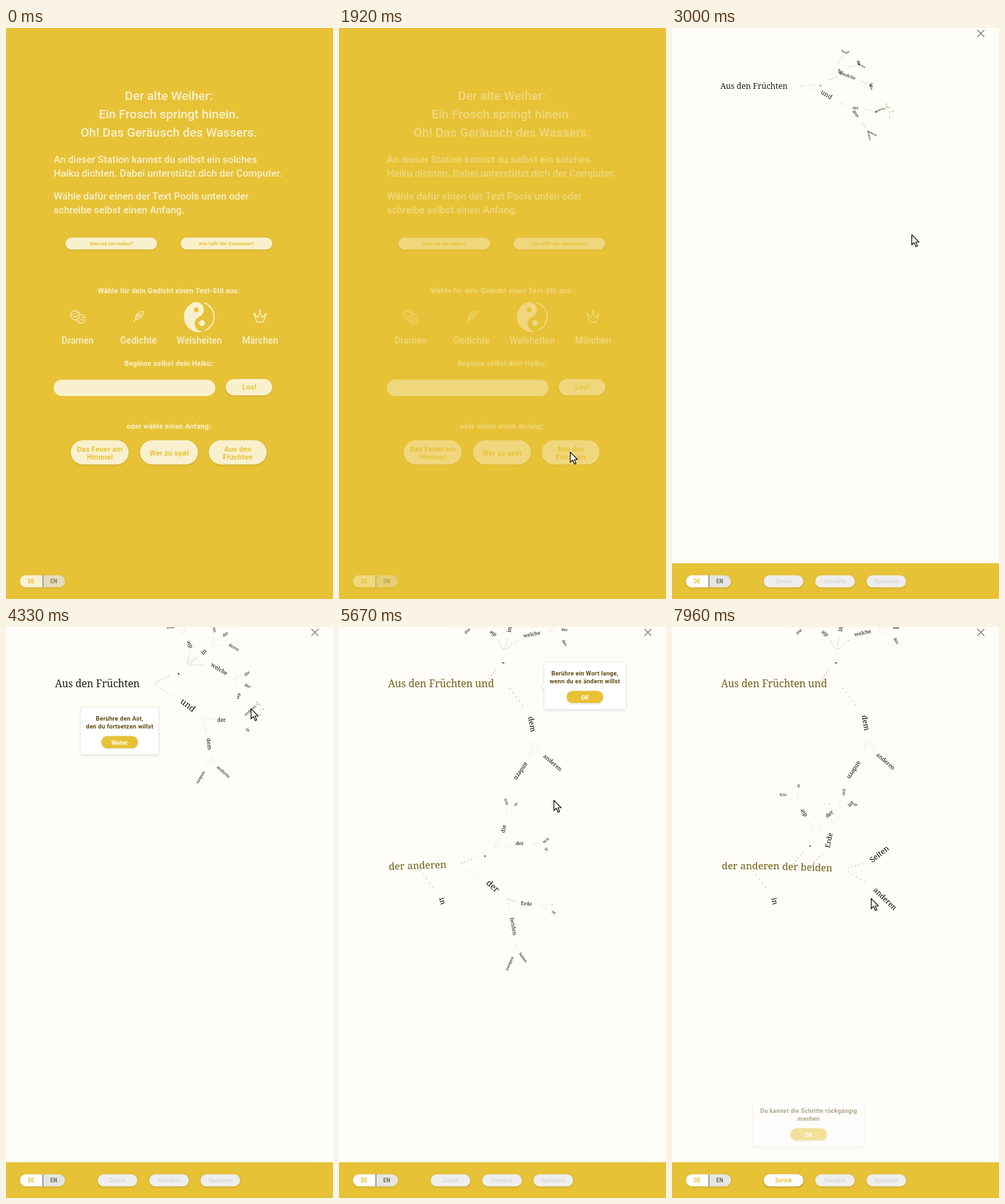
Recreate the animation shown at these times as an HTML page. Size 500x872 px, loop 8 s.

```html
<!DOCTYPE html>
<html lang="de">
<head>
<meta charset="utf-8">
<title>Haiku</title>
<style>
  html, body { margin: 0; width: 100%; height: 100%; overflow: hidden; background: #e7c236; }
  svg { display: block; width: 100%; height: 100%; }
  text { font-family: Roboto, "Open Sans", sans-serif; font-weight: 500; }
  .bold { font-weight: 700; }
  .serif { font-family: "Noto Serif", serif; font-weight: 400; }
  .raised { filter: drop-shadow(0 1px 1.5px rgba(60, 45, 0, .2)); }
  .card { filter: drop-shadow(0 1px 2px rgba(0, 0, 0, .16)); }
</style>
</head>
<body>
<svg id="stage" viewBox="0 0 500 872"></svg>
<script>
const LOOP = 8000;
const YELLOW = '#e7c236', PAPER = '#fefdf8';
const stage = document.getElementById('stage');

function el(parent, tag, attrs = {}, content) {
  const node = document.createElementNS('http://www.w3.org/2000/svg', tag);
  for (const name in attrs) node.setAttribute(name, attrs[name]);
  if (content) node.textContent = content;
  parent.append(node);
  return node;
}

// y is the middle of the capitals
function label(parent, content, x, y, size, fill, more = {}) {
  return el(parent, 'text', {
    x, y: y + size * .355, 'font-size': size, fill, 'text-anchor': 'middle', ...more
  }, content);
}

const bold = { class: 'bold' };
const spaced = { class: 'bold', 'letter-spacing': .25 };

function pill(parent, x, y, w, h, fill, shadow = true) {
  return el(parent, 'rect', { x, y, width: w, height: h, rx: h / 2, fill, class: shadow ? 'raised' : '' });
}

function languageSwitch(parent) {
  const g = el(parent, 'g', { class: 'raised' });
  el(g, 'path', { d: 'M30.500 835.800H56V854.200H30.500a9.200 9.200 0 0 1 0-18.400z', fill: '#fff' });
  el(g, 'path', { d: 'M56 835.800H81a9.200 9.200 0 0 1 0 18.400H56z', fill: '#e4e4e1' });
  el(g, 'path', { d: 'M56.400 835.800V854.200', stroke: '#555', 'stroke-width': 1 });
  label(g, 'DE', 38.5, 845.5, 8.2, YELLOW, bold);
  label(g, 'EN', 73, 845.5, 8.2, '#6d6a60', bold);
}

/* ---------- start page ---------- */
const intro = el(stage, 'g');
['Der alte Weiher:', 'Ein Frosch springt hinein.', 'Oh! Das Geräusch des Wassers.']
  .forEach((line, i) => label(intro, line, 249, 103 + i * 28, 19, PAPER));
[['An dieser Station kannst du selbst ein solches', 201],
 ['Haiku dichten. Dabei unterstützt dich der Computer.', 221.5],
 ['Wähle dafür einen der Text Pools unten oder', 257],
 ['schreibe selbst einen Anfang.', 277.5]
].forEach(([line, y]) => label(intro, line, 73, y, 15.1, PAPER, { 'text-anchor': 'start' }));

pill(intro, 91, 320, 140, 18.3, PAPER);
label(intro, 'Was ist ein Haiku?', 161, 329, 8, YELLOW, bold);
pill(intro, 267, 320, 140, 18.3, PAPER);
label(intro, 'Wie hilft der Computer?', 337, 329, 8, YELLOW, bold);

label(intro, 'Wähle für dein Gedicht einen Text-Stil aus:', 249, 401, 10.8, PAPER, spaced);
label(intro, 'Beginne selbst dein Haiku:', 249, 512, 10.8, PAPER, spaced);
label(intro, 'oder wähle einen Anfang:', 249, 608, 10.8, PAPER, spaced);
[['Dramen', 109.5], ['Gedichte', 202.5], ['Weisheiten', 295.5], ['Märchen', 388.5]]
  .forEach(([name, x]) => label(intro, name, x, 477, 14, PAPER));

const icons = el(intro, 'g', {
  fill: 'none', stroke: PAPER, 'stroke-width': 1.1, 'stroke-linecap': 'round', 'stroke-linejoin': 'round'
});
el(icons, 'circle', { cx: 114, cy: 444, r: 6.8 });
el(icons, 'circle', { cx: 105.7, cy: 438.7, r: 7, fill: YELLOW });
el(icons, 'path', { d: 'M101 438l3-1.5M107 436l3-1.5M102 441q4 2 8-2M111 448q3-4 7-2M115 442l3 .5' });
el(icons, 'path', { d: 'M195 449Q199 442 206 436M198 445C197 438 202 433 210.500 432.500C209 439 206 446 198 445M202 440h4M201 436v4' });
el(icons, 'path', { d: 'M380 438l3.500 11h10l3.500-11l-5.500 4l-3-8l-3 8z', 'stroke-width': 1.3 });
[[380, 437], [388.5, 432], [397, 437]].forEach(([cx, cy]) => el(icons, 'circle', { cx, cy, r: 1.1, fill: PAPER }));
const yin = el(icons, 'g', { transform: 'translate(295.5 441) rotate(-24)', stroke: 'none' });
el(yin, 'path', { d: 'M0 23.500A23.500 23.500 0 0 1 0-23.500A11.750 11.750 0 0 1 0 0A11.750 11.750 0 0 0 0 23.500', fill: PAPER });
el(yin, 'path', { d: 'M16-16A22.600 22.600 0 0 1 0 22.600', stroke: PAPER, 'stroke-width': 1.9 });
el(yin, 'circle', { cy: -11.5, r: 3.6, fill: YELLOW });
el(yin, 'circle', { cy: 10.5, r: 4.6, fill: PAPER });

pill(intro, 73, 537, 247, 25, PAPER, false);
pill(intro, 336, 536, 71, 25, PAPER);
label(intro, 'Los!', 372, 548.5, 11, YELLOW, spaced);
[['Das Feuer am', 'Himmel', 99], ['Wer zu spät', '', 205], ['Aus den', 'Früchten', 310]].forEach(([a, b, x]) => {
  pill(intro, x, 629.5, 88.5, 37, PAPER);
  label(intro, a, x + 44.5, b ? 643.5 : 649, 10.9, YELLOW, spaced);
  if (b) label(intro, b, x + 44.5, 655, 10.9, YELLOW, spaced);
});
languageSwitch(intro);

/* ---------- editor page ---------- */
const editor = el(stage, 'g');
el(editor, 'rect', { width: 500, height: 818, fill: PAPER });
el(editor, 'path', { d: 'M467 3l10.500 10.500M477.500 3L467 13.500', stroke: '#8d8d8a', 'stroke-width': 1.7 });
const tree = el(editor, 'g');
const spinner = el(editor, 'path', {
  d: 'M8.300 0A8.300 8.300 0 1 1 -8.200-1.400', fill: 'none', stroke: '#8d8d8a', 'stroke-width': 1.3
});
el(editor, 'rect', { y: 817.4, width: 500, height: 55, fill: YELLOW });
languageSwitch(editor);

function footerButton(name, x, fill, ink) {
  const g = el(editor, 'g');
  pill(g, x, 835.8, 60.5, 18.4, fill);
  label(g, name, x + 30.3, 845.5, 8.2, ink, bold);
  return g;
}
[['Zurück', 140.2], ['Vorwärts', 219], ['Speichern', 297.4]]
  .forEach(([name, x]) => footerButton(name, x, '#eeeeec', '#d9d9d6'));
const backButton = footerButton('Zurück', 140.2, '#fff', YELLOW);

/* ---------- word tree ---------- */
const ruler = document.createElement('canvas').getContext('2d');
ruler.font = '100px "Noto Serif", serif';
const DOTS = [.14, .27, .4, .53, .66];
const words = [];

// poses: [x, y, angle, size] of the word's inner end, one per layout A to E
function word(text, parent, poses, join = Infinity) {
  const w = {
    text, parent, poses, join,
    width: ruler.measureText(text).width / 100,
    birth: poses.A ? 2500 : 4950,
    dots: parent ? DOTS.map(() => el(tree, 'circle', { fill: '#8a8055' })) : [],
    node: el(tree, 'text', { class: 'serif' }, text)
  };
  words.push(w);
  return w;
}

const root = word('Aus den Früchten', null, { A: [74, 89, 0, 12.2], B: [75, 87, 0, 15.35] }, 4500);
const und = word('und', root, { A: [228, 97, 32, 9.8], B: [268, 112, 38, 13.2], C: [208, 87, 0, 15.35] }, 4500);
const comma = word(',', root, { A: [225, 86, -20, 9], B: [260.5, 69.5, -35, 13], C: [247, 55.5, -75, 13] });
const welche = word('welche', comma, { A: [260, 70, 20, 6.4], B: [314, 57, 32, 8.3], C: [282, 14, -11, 7.8], D: [279, 12, -12, 7.8] });
const inUp = word('in', comma, { A: [257, 70, -45, 6], B: [299, 41, -40, 9], C: [260, 8, -80, 8.5], D: [257, 7, -78, 8.5] });
const dieUp = word('die', comma, { A: [258, 71, -110, 6], B: [283, 32, -115, 8], C: [240, 13, -145, 7.5], D: [238, 13, -145, 7.5] });
word('mir', dieUp, { A: [264, 38, -140, 4], B: [257, 0, 178, 6.5], C: [200, 3, 138, 6], D: [198, 4, 138, 6] });
word('den', dieUp, { A: [265, 39, -30, 4], B: [274, -5, -80, 6], C: [212, -8, -100, 6] });
word('deren', inUp, { A: [285, 55, 28, 4.2], B: [341, 27, 30, 6.1], C: [285, -20, -30, 6] });
word('die', inUp, { A: [285, 56, -80, 4], B: [332, 14, -38, 6], C: [266, -22, -80, 6] });
word('und', inUp, { A: [286, 57, -110, 4], B: [319, 8, -100, 6], C: [250, -22, -100, 6] });
word('die', welche, { A: [302, 88, -40, 4], B: [365, 74, -38, 6], C: [336, -6, -40, 6] });
word('der', welche, { A: [302, 87, 25, 4], B: [365, 88, 25, 6], C: [340, 4, 5, 6], D: [338, 1, 0, 6] });
word('das', welche, { A: [303, 88, 65, 4.3], B: [357, 101, 105, 6], C: [342, 20, 58, 6], D: [340, 17, 58, 6] });

const der = word('der', und, { A: [276, 122, 5, 5.8], B: [323, 143, 0, 8.1], C: [76, 366.5, -2, 14.9], D: [76, 366, 0, 14.9] }, 4500);
const dem = word('dem', und, { A: [277, 126, 52, 6], B: [309, 170, 82, 8.4], C: [292.5, 137, 80, 11.2], D: [293.5, 135, 80, 11.2] });
const anderen = word('anderen', der, { A: [310, 128, -20, 4.2], B: [365, 135, -41, 5.6], C: [104.6, 365.5, -2, 14.9], D: [104.6, 366, 0, 14.9] }, 4500);
word('in', der, { A: [311, 127, 40, 4], B: [368, 155, 50, 6], C: [156.5, 413.5, 75, 11], D: [155.5, 413.5, 78, 11] });
word('anderen', dem, { A: [299, 157, 28, 4], B: [323, 213, 42, 6.2], C: [313.5, 196, 41, 8.6], D: [313.5, 194, 41, 8.6] });
word('andern', dem, { A: [300, 158, 78, 4], B: [303, 221, 121, 6], C: [287, 207.5, 125, 8.9], D: [287, 205.5, 124, 8.9] });

const comma2 = word(',', anderen, { C: [220, 348, -35, 12], D: [218.5, 345.5, -30, 12], E: [207.5, 333.5, -50, 11.5] });
const der2 = word('der', anderen, { C: [227, 389, 42, 13.2], D: [224, 385, 34, 13.5], E: [168.5, 366.5, 1, 14.9] }, 6950);
const die2 = word('die', comma2, { C: [251, 314, -80, 8], D: [241, 305, -95, 8], E: [205, 289, -125, 8.5] });
const der3 = word('der', comma2, { C: [270, 331, 0, 7.7], D: [266, 322, -3, 7.7], E: [236, 290, -40, 8] });
word('sich', die2, { C: [257, 272, -105, 5.5], D: [234, 263, -140, 5.5], E: [175, 257, -172, 5.5] });
word('in', die2, { C: [269, 273, -55, 5.5], D: [255, 262, -50, 5.5], E: [193, 245, -80, 5.5] });
word('sich', der3, { C: [312, 329, -35, 5.5], D: [307, 310, -50, 5.5], E: [262, 257, -80, 5.5] });
word('in', der3, { C: [315, 338, 35, 5.5], D: [312, 329, 35, 5.5], E: [278, 271, 0, 5.5] });
const erde = word('Erde', der2, { C: [278, 422, 6, 7.6], D: [282, 408, -14, 8.1], E: [238, 337, -78, 10.2] });
const beiden = word('beiden', der2, { C: [264, 444, 80, 8.4], D: [269, 435, 66, 9.7], E: [196.7, 367.2, 2, 14.9] }, 6800);
word('ist', erde, { C: [326, 434, 40, 5.5], D: [335, 409, 38, 5.5], E: [270, 273, -38, 8] });
word(',', erde, { C: [325, 423, -10, 6], D: [327, 390, -30, 6], E: [239, 270, -80, 6] });
word('Seiten', beiden, { C: [276, 498, 54, 5.8], D: [298, 488, 30, 6.6], E: [304, 357.5, -38, 11.5] });
word('anderen', beiden, { C: [266, 504, 115, 5.7], D: [280, 500, 110, 6.5], E: [309.5, 400, 44, 11.1] });

/* ---------- hint cards ---------- */
function hint(x, y, w, lines, button, arrow) {
  const g = el(stage, 'g'), box = el(g, 'g', { class: 'card', fill: '#fff' }), mid = x + w / 2;
  el(box, 'rect', { x, y, width: w, height: 71, rx: 1.5 });
  el(box, 'path', { d: arrow });
  lines.forEach((line, i) => label(g, line, mid, y + 16 + i * 12, 9.2, '#5c4a0e', spaced));
  pill(g, mid - 28, y + 43, 56, 18.6, YELLOW);
  label(g, button, mid, y + 53, 8.6, '#fff', bold);
  return g;
}
const hints = [
  [hint(114.5, 123.5, 118.5, ['Berühre den Ast,', 'den du fortsetzen willst'], 'Weiter', 'M169.500 124l4.500-4l4.500 4z'), 3400, 3900, 4400, 4800],
  [hint(314, 54.5, 124, ['Berühre ein Wort lange,', 'wenn du es ändern willst'], 'OK', 'M314.500 86l-4.500 4.500l4.500 4.500z'), 4900, 5400, 6860, 7140],
  [hint(124, 722.5, 170, ['Du kannst die Schritte rückgängig', 'machen'], 'OK', 'M204.500 793l4.500 4.500l4.500-4.500z'), 7670, 8270, 9000, 9100]
];

const pointer = el(stage, 'path', {
  d: 'M.6 .6V16.200L4.200 12.800L7 19L9.400 17.900L6.700 12H11.700Z',
  fill: '#fff', stroke: '#111', 'stroke-width': 1.2, 'stroke-linejoin': 'round'
});
const pointerPath = [
  [630, -14, 609], [1460, 353, 647], [2500, 353, 647], [3000, 366, 315], [3300, 367, 306],
  [4000, 373, 123], [4150, 373, 123], [4180, 374, 124], [4600, 374, 124], [5670, 328, 264],
  [6000, 328, 264], [6700, 273, 465], [7300, 273, 465], [7960, 304, 414]
];

/* ---------- time ---------- */
const ramp = (t, a, b) => Math.min(1, Math.max(0, (t - a) / (b - a)));
const easeOut = k => 1 - (1 - k) ** 2;
const smooth = k => k * k * (3 - 2 * k);
const mix = (a, b, k) => a + (b - a) * k;
const mixAll = (a, b, k) => a.map((v, i) => mix(v, b[i], k));
const show = (node, k) => node.setAttribute('opacity', k.toFixed(3));

const MOVES = [['B', 3000, 4000], ['C', 4450, 5670], ['D', 5670, 6710], ['E', 7250, 7880]];

function along(w, distance) {
  const [x, y, angle] = w.now, rad = angle * Math.PI / 180;
  return [x + Math.cos(rad) * distance, y + Math.sin(rad) * distance];
}

function placeWord(w, t) {
  let p = w.poses.A || w.poses.C;
  for (const [key, a, b] of MOVES) {
    if (w.poses[key]) p = mixAll(p, w.poses[key], easeOut(ramp(t, a, b)));
  }
  const grown = easeOut(ramp(t, w.birth, w.birth + 500));
  if (w.parent) {
    const [px, py] = along(w.parent, w.parent.width * w.parent.now[3]);
    p = [mix(px, p[0], grown), mix(py, p[1], grown), p[2], p[3] * mix(.3, 1, grown)];
  }
  w.now = p;
  const joined = ramp(t, w.join, w.join + 450);
  const ink = mixAll([28, 27, 18], [112, 91, 18], joined).map(Math.round);
  w.node.setAttribute('transform', `translate(${p[0]} ${p[1]}) rotate(${p[2]})`);
  w.node.setAttribute('font-size', p[3]);
  w.node.setAttribute('y', p[3] * .3);
  w.node.setAttribute('fill', `rgb(${ink})`);
  show(w.node, grown);

  if (!w.parent) return;
  const size = w.parent.now[3];
  const [fx, fy] = along(w.parent, size * (w.parent.width + 1.25));
  w.dots.forEach((dot, i) => {
    dot.setAttribute('cx', mix(fx, p[0], DOTS[i]));
    dot.setAttribute('cy', mix(fy, p[1], DOTS[i]));
    dot.setAttribute('r', Math.max(.35, size * .041));
    show(dot, .5 * grown * (1 - joined));
  });
}

function placePointer(t) {
  let [, x, y] = pointerPath[0];
  for (let i = 1; i < pointerPath.length; i++) {
    const k = smooth(ramp(t, pointerPath[i - 1][0], pointerPath[i][0]));
    x = mix(x, pointerPath[i][1], k);
    y = mix(y, pointerPath[i][2], k);
  }
  pointer.setAttribute('transform', `translate(${x} ${y})`);
  show(pointer, t < 640 ? 0 : 1);
}

function draw(t) {
  show(intro, mix(.79, 1, ramp(t, 20, 170)) * (1 - ramp(t, 1540, 2140)));
  show(editor, ramp(t, 2470, 2960));
  words.forEach(w => placeWord(w, t));
  hints.forEach(([g, a, b, c, d]) => show(g, ramp(t, a, b) * (1 - ramp(t, c, d))));
  show(backButton, ramp(t, 6850, 7040));
  const busy = Math.max(ramp(t, 4330, 4480) * (1 - ramp(t, 4900, 5050)), ramp(t, 6830, 6980) * (1 - ramp(t, 7250, 7400)));
  spinner.setAttribute('transform', `translate(29 676) rotate(${(t - 7080) * .36 - 35})`);
  show(spinner, busy);
  placePointer(t);
}

const start = performance.now();
function tick() {
  draw((performance.now() - start) % LOOP);
  requestAnimationFrame(tick);
}
tick();
</script>
</body>
</html>
```
